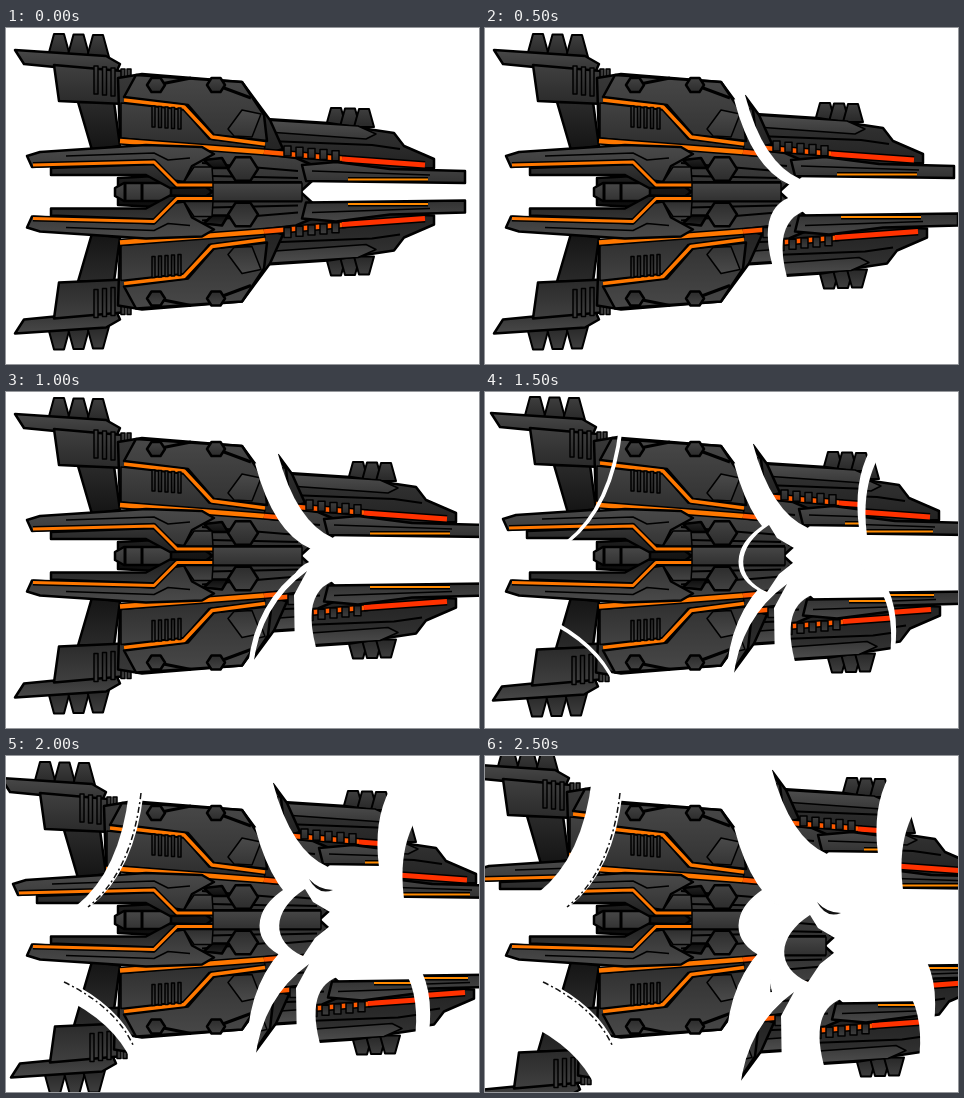
Recreate the animation shown at these times as an HTML page with a canvas. Size 473 by 336 pixels, loop 3 s.

```html
<!DOCTYPE html>
<html>
<head>
<meta charset="utf-8">
<style>
  html, body { margin: 0; overflow: hidden; background: #fff; }
  canvas { display: block; }
</style>
</head>
<body>
<canvas id="stage" width="473" height="336"></canvas>
<script>
const W = 473, H = 336, MIRROR = 327.5, STEP = 500, STEPS = 6;
const view = document.getElementById('stage').getContext('2d');
const ship = document.createElement('canvas');
ship.width = W;
ship.height = H;
const g = ship.getContext('2d');
g.lineJoin = 'round';

// A metal plate, lighter at its upper edge
function plate(points, tone = 64, outline = 2.5) {
  const path = new Path2D(`M${points}Z`);
  const ys = points.split(' ').map(p => +p.split(',')[1]);
  const fill = g.createLinearGradient(0, Math.min(...ys), 0, Math.max(...ys));
  [tone + 8, tone - 14].forEach((v, stop) => fill.addColorStop(stop, `rgb(${v},${v},${v})`));
  g.fillStyle = fill;
  g.fill(path);
  g.lineWidth = outline;
  g.strokeStyle = '#000';
  g.stroke(path);
}

function line(points, width = 1.5, color = '#000') {
  g.strokeStyle = color;
  g.lineWidth = width;
  g.stroke(new Path2D(`M${points}`));
}

function glow(points, width, color = '#ff7800') {
  line(points, width + 3);
  line(points, width, color);
}

// Equal upright slabs along a sloping row
function row(count, x, y, step, slope, width, height, taper = 0) {
  for (let i = 0; i < count; i++) {
    const l = x + i * step, r = l + width, t = y + i * slope, b = t + height;
    plate(`${l},${b} ${l + taper},${t} ${r - taper},${t} ${r},${b}`, 54, taper ? 2 : 1.5);
  }
}

function hexagon(x, y, r) {
  const corners = [0, 1, 2, 3, 4, 5].map(i => {
    const a = i * Math.PI / 3;
    return `${x + r * Math.cos(a)},${y + r * .9 * Math.sin(a)}`;
  });
  plate(corners.join(' '), 58);
}

function drawHalf() {
  // Rear wing
  plate('72,74 108,74 114,118 86,122', 34);
  row(3, 42, 6, 19.5, .5, 22, 22, 6);
  plate('9,22 100,28 114,36 110,45 18,36');
  plate('48,37 116,43 118,76 53,73', 56);
  row(3, 88, 38, 8.5, 1, 4, 28);
  row(2, 115, 41, 6, 0, 4, 19);

  // Forward wing
  row(3, 320, 80, 14, .5, 20, 18, 5);
  plate('245,90 322,95 388,105 398,118 428,131 428,140 300,145 250,125', 46);
  plate('258,92 352,98 370,106 360,111 262,104', 70, 1.5);
  line('262,113 366,117 394,121', 2);

  // Upper hull
  plate('112,50 136,46 236,54 264,92 277,121 255,128 114,114', 48);
  plate('130,47 236,54 258,87 261,113 208,107 182,77 118,69');
  plate('222,101 236,82 255,86 246,109 228,108', 66, 1.5);
  plate('115,75 178,82 203,111 259,118 258,123 115,110', 58, 1.5);
  glow('118,72 178,79 206,109 259,116', 3.5);
  row(5, 146, 78, 6.5, .5, 3, 21);
  for (const x of [150, 210]) {
    line(`${x},57 ${x + 35},${x / 3}`, 3);
    hexagon(x, 57, 9);
  }

  // Core
  plate('150,124 215,121 290,130 318,142 294,164 207,164', 60);
  line('196,135 292,143 M205,148 292,150 M207,154 296,154', 2);
  plate('198,132 216,130 222,140 206,140', 28);
  hexagon(237, 141, 15);

  // Lit seam running through the slotted rail
  glow('114,113 258,124', 4.5);
  glow('258,124 340,131', 4.5, '#ff5a00');
  glow('336,131 419,137', 5, '#ff3200');
  row(5, 278, 118, 12, 1.2, 7, 10);

  // Gun
  plate('296,137 330,134 384,141 459,143 459,155 300,153');
  line('306,143 424,147');
  glow('342,151.5 422,151.5', 2, '#ff8a00');

  // Nose blade
  plate('45,140 150,136 172,159 206,159 164,160 140,147 45,147', 44);
  plate('21,128 34,124 140,117 196,119 208,126 186,138 178,154 164,152 148,132 26,139', 66);
  line('60,128 148,125 162,132 184,130', 1.5);
  plate('178,154 188,139 206,139 207,154', 60, 1.5);
  glow('27,137 148,134 171,157 207,157', 3);
}

function drawShip() {
  plate('112,150 205,145 205,182 112,177', 24);
  plate('109,160 118,155 158,155 165,160 165,168 158,173 118,173 109,168');
  line('119,156 119,172 M136,156 136,172', 3);
  drawHalf();
  g.setTransform(1, 0, 0, -1, 0, MIRROR);
  drawHalf();
  g.resetTransform();
  plate('207,155 296,155 296,173 207,173', 62, 1.5);
}

// Each fragment breaks off along a curve at one step, then takes one offset per step
const foreCut = 'M300,60L250,72Q268,140 305,156';
const aftCut = 'M305,170Q270,184 292,250';
const tailCut = 'M137,36Q128,115 84,150';
const keelCut = 'M60,225Q112,250 130,290';
const fragments = [
  [foreCut + 'L473,158 473,60Z', 1, [10, -5], [22, -10]],
  [foreCut + 'L356,156Q350,110 367,78L340,60Z', 3, [18, -20], [17, -45], [37, -58]],
  ['M367,78Q350,110 356,156L473,158 473,60Z', 3, [26, -12], [42, -13], [62, -22]],
  [aftCut + 'L473,260 473,170Z', 1, [14, 13], [22, 19]],
  [aftCut + 'L380,250Q390,200 376,170Z', 3, [22, 33], [26, 51], [51, 73]],
  ['M376,170Q390,200 380,250L473,260 473,170Z', 3, [27, 27], [40, 46], [66, 36]],
  ['M280,133C246,155 246,186 278,200L290,182 305,170 305,156 288,146Z', 3, [4, 0], [19, 0], [45, 26]],
  ['M297,176Q250,210 243,272L285,262 284,200Z', 2, [4, 3], [5, 16], [6, 32], [12, 60]],
  [tailCut + 'L0,150 0,0 137,0Z', 3, [-3, -1], [-14, 0], [-30, -14]],
  [keelCut + 'L130,336 0,336 0,225Z', 3, [-1, 3], [-4, 16], [-19, 42]]
].map(([outline, start, ...offsets]) => ({ path: new Path2D(outline), start, offsets }));

const splinters = new Path2D(tailCut + keelCut);
const sliver = new Path2D('M0,0Q10,11 24,11Q9,17 0,0');

function render(step) {
  view.fillStyle = view.strokeStyle = '#fff';
  view.lineWidth = 1.5;
  view.fillRect(0, 0, W, H);
  view.drawImage(ship, 0, 0);
  const moved = fragments.filter(f => f.offsets[step - f.start]);
  for (const { path } of moved) {
    view.fill(path);
    view.stroke(path);
  }
  for (const { path, start, offsets } of moved) {
    view.save();
    view.translate(...offsets[step - start]);
    view.clip(path);
    view.drawImage(ship, 0, 0);
    view.restore();
  }
  if (step < 4) return;

  // Crumbs left behind by the last breaks
  view.save();
  view.strokeStyle = view.fillStyle = '#111';
  view.setLineDash([6, 3, 2, 3]);
  view.translate(-2, 1);
  view.stroke(splinters);
  view.translate(189 + 29 * step, 30 + 23 * step);
  view.fill(sliver);
  view.restore();
}

function tick() {
  render(Math.floor(performance.now() / STEP) % STEPS);
  requestAnimationFrame(tick);
}

drawShip();
tick();
</script>
</body>
</html>
```
